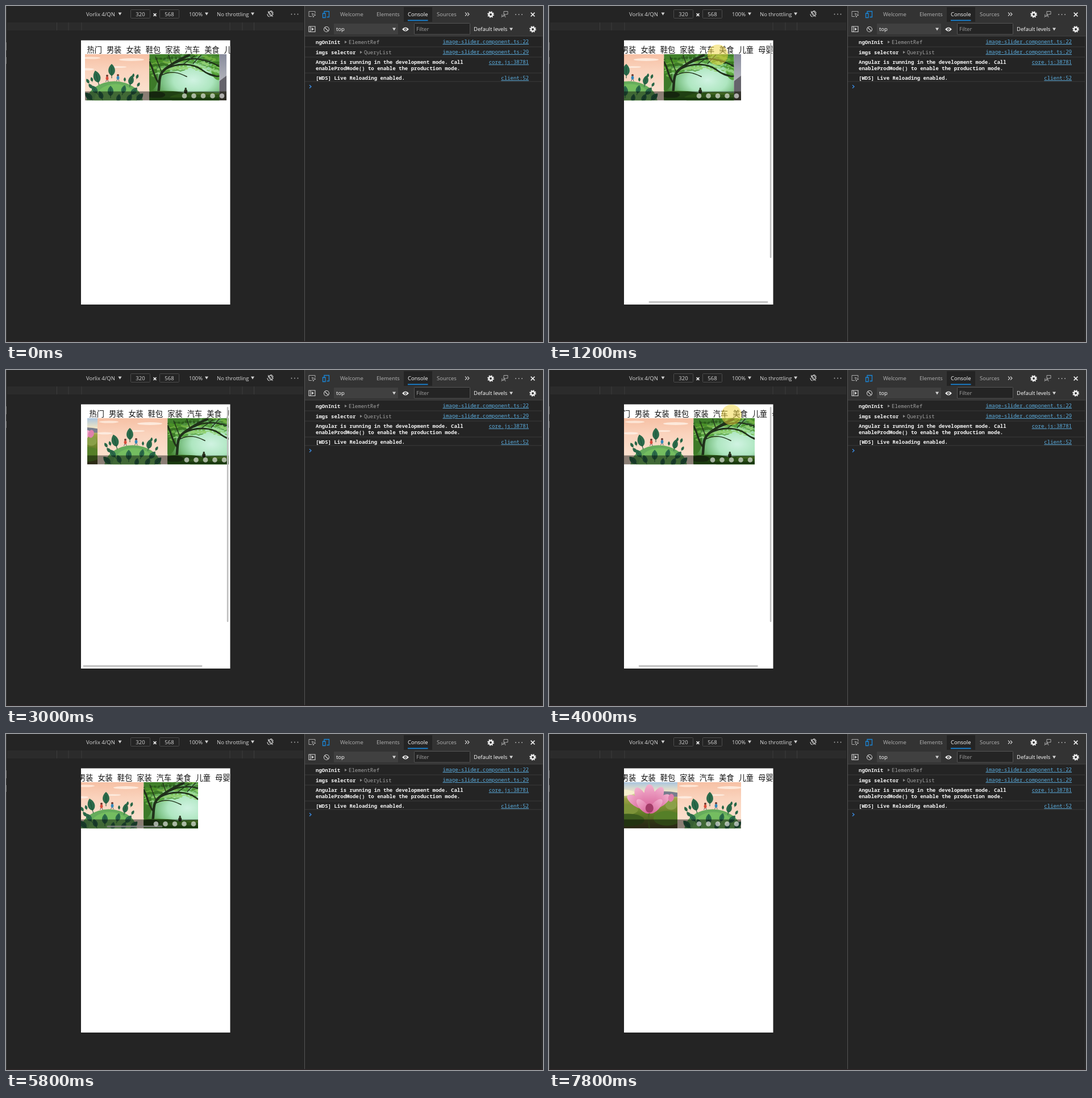
Animation of 945 by 592 pixels, one loop 8 s. Source, as an HTML page:

```html
<!DOCTYPE html>
<html lang="en">
<head>
<meta charset="utf-8">
<title>Slider in device mode</title>
<style>
  html, body { margin: 0; width: 100%; height: 100%; overflow: hidden; background: #242424; }
  svg { display: block; width: 945px; height: 592px; }
  text { font: 9.5px "Open Sans", "Noto Sans", sans-serif; fill: #d8d8d8; white-space: pre; }
  .mono { font: 9.03px "Noto Sans Mono", "DejaVu Sans Mono", monospace; }
  .log { font-weight: 600; fill: #f4f4f4; }
  .dim { fill: #a2a2a2; }
  .idle { fill: #b4b4b4; }
  .bright { fill: #fff; }
  .link { fill: #5caee0; text-anchor: end; text-decoration: underline; }
  .mid { text-anchor: middle; }
  .tab { font: 13.2px "Noto Sans CJK SC", "Noto Sans CJK", sans-serif; fill: #111; }
  .line { fill: none; stroke: #d4d4d4; stroke-width: 1.1; }
</style>
</head>
<body>
<svg viewBox="0 0 945 592">
  <defs>
    <clipPath id="screen"><rect x="132" y="60.5" width="262.5" height="465.5"/></clipPath>
    <clipPath id="window"><rect x="143" y="84.5" width="249" height="82"/></clipPath>
    <clipPath id="photo"><rect width="123.3" height="82"/></clipPath>
    <linearGradient id="peach" x2="0" y2="1">
      <stop stop-color="#f6c0a4"/><stop offset=".35" stop-color="#fad3bd"/><stop offset="1" stop-color="#fbe6d5"/>
    </linearGradient>
    <radialGradient id="glade" cx=".62" cy=".56" r=".62">
      <stop stop-color="#d0f3e2"/><stop offset=".45" stop-color="#aee6c0"/><stop offset=".7" stop-color="#7cc184"/><stop offset="1" stop-color="#41802b"/>
    </radialGradient>
    <linearGradient id="dawn" x2="0" y2="1">
      <stop stop-color="#a9c4df"/><stop offset=".22" stop-color="#f2e6c4"/><stop offset=".36" stop-color="#9ba245"/>
      <stop offset=".7" stop-color="#5d7a25"/><stop offset="1" stop-color="#4b4526"/>
    </linearGradient>
    <linearGradient id="storm" x2="0" y2="1">
      <stop stop-color="#878b9c"/><stop offset=".6" stop-color="#b3b4bc"/><stop offset=".75" stop-color="#6f6c64"/><stop offset="1" stop-color="#4c4a3c"/>
    </linearGradient>
    <linearGradient id="petal" x2="0" y2="1"><stop stop-color="#f3b1cf"/><stop offset="1" stop-color="#d65f96"/></linearGradient>
  </defs>
  <g id="chrome"></g>
  <g clip-path="url(#screen)">
    <rect x="132" y="60" width="263" height="467" fill="#fff"/>
    <g id="page">
      <g id="tabs"></g>
      <g clip-path="url(#window)">
        <g id="track"></g>
        <rect x="143" y="150.5" width="249" height="16" fill="#000" opacity=".45"/>
        <rect id="thumb" y="161.5" width="98" height="3" rx="1.5" fill="#888"/>
        <g id="dots"></g>
      </g>
    </g>
    <g id="bars" fill="#bfbfbf">
      <rect x="388.8" y="65" width="2.6" height="379" rx="1.3"/>
      <rect id="hbar" y="520.3" width="210" height="2.6" rx="1.3"/>
    </g>
    <circle id="touch" r="18" fill="#f2d63c" opacity=".5"/>
  </g>
</svg>
<script>
const $ = id => document.getElementById(id);
const rect = (x, y, w, h, fill, more = '') => `<rect x="${x}" y="${y}" width="${w}" height="${h}" fill="${fill}" ${more}/>`;
const text = (x, y, s, cls = '') => `<text x="${x}" y="${y}" class="${cls}">${s}</text>`;
const path = (d, more = 'class="line"') => `<path d="${d}" ${more}/>`;
const oval = (x, y, rx, ry, fill, turn = 0) =>
  `<ellipse cx="${x}" cy="${y}" rx="${rx}" ry="${ry}" fill="${fill}" transform="rotate(${turn} ${x} ${y})"/>`;
const down = (x, y) => path(`M${x - 3} ${y - 2.5}h6l-3 5z`, 'fill="#d4d4d4"');
const more = (x, y) => [0, 5.5, 11].map(d => oval(x + d, y, .9, .9, '#b5b5b5')).join('');
const gear = (x, y) => `<g fill="none" stroke="#f0f0f0"><circle cx="${x}" cy="${y}" r="3.2" stroke-width="2.6"/>
  <circle cx="${x}" cy="${y}" r="5" stroke-width="1.8" stroke-dasharray="1.96"/></g>`;
const cross = (x, y, r) => path(`M${x - r} ${y - r}l${2 * r} ${2 * r}m0 ${-2 * r}l${-2 * r} ${2 * r}`, 'stroke="#f0f0f0" stroke-width="1.5"');

function deviceBar() {
  const field = (x, s) => rect(x + .5, 6.5, 34, 15, '#242424', 'stroke="#4c4c4c" rx="1"') + text(x + 17.5, 17.5, s, 'mid');
  return rect(0, 0, 945, 592, '#242424') + rect(2, 29, 521, 14, '#2b2b2b')
    + [89, 109.5, 132.5, 393.5, 415.5, 436].map(x => rect(x, 29, 1, 14, '#3d3d3d')).join('')
    + rect(0, 0, 1, 592, '#3f3f3f') + rect(0, 64, 1, 14, '#777') + rect(0, 90, 1, 12, '#777')
    + text(141, 17.5, 'Vorlix 4/QN') + down(200.5, 14) + field(219, '320') + cross(262, 15.5, 2.4) + field(270, '568')
    + text(322, 17.5, '100%') + down(353, 14) + text(371, 17.5, 'No throttling') + down(434, 14)
    + path('M461.5 11.5l4-2.5 4.5 6-4 3zM460 14a5 5 0 0 0 4 5M470 13a5 5 0 0 0-4-4.5M461 9l8.5 10') + more(502.5, 14.5);
}

function toolTabs() {
  return rect(526, 0, 419, 28, '#333') + rect(700, 2, 50, 26, '#242424') + rect(707, 24.5, 35.5, 1.8, '#1a86d8')
    + path('M538 18.5h-5v-9h11v4M538.5 13l6.5 3-3 1-1.3 3z', 'fill="none" stroke="#aaa"')
    + path('M560 14v-4.500h8.500v10h-4M557.500 13h4.500v7.500h-4.500z', 'fill="none" stroke="#1a86d8" stroke-width="1.3"')
    + text(588, 18, 'Welcome', 'idle') + text(652, 18, 'Elements', 'idle')
    + text(707, 18, 'Console', 'bright') + text(758, 18, 'Sources', 'idle')
    + path('M808 11.500l3 3-3 3m4-6l3 3-3 3') + gear(853, 15)
    + path('M876 9.500h7v5h-3l-2 2v-2h-2zM872 20a3.500 3 0 0 1 7 0M873.500 14.500a2 2 0 1 0 2 0', 'fill="none" stroke="#aaa"')
    + more(897, 15) + cross(927, 15, 3.4);
}

function consoleBar() {
  return rect(526, 28, 419, 25, '#333') + rect(526, 52.5, 419, 1, '#444')
    + path('M533 36h11v9.500h-11zM536 36v9.500') + path('M538 38l4 2.700-4 2.700z', 'fill="#d4d4d4"')
    + `<circle cx="564" cy="41" r="4.500" class="line"/>` + path('M561 38l6 6') + rect(577, 31, 113, 19, '#404040', 'rx="1"')
    + text(581, 44, 'top', 'bright') + down(683, 41)
    + path('M697 41q6-7 12 0q-6 7-12 0z', 'fill="#f0f0f0"') + oval(703, 41, 2.2, 2.2, '#333') + oval(703, 41, 1, 1, '#f0f0f0')
    + rect(718.5, 30.5, 98, 19.5, '#242424', 'stroke="#555" rx="1"') + text(722, 44, 'Filter', 'dim')
    + text(823, 44, 'Default levels', 'bright') + down(889, 41) + gear(927, 41);
}

function logRows() {
  const log = (y, s) => text(545, y, s, 'mono log');
  const link = (y, s) => text(920, y, s, 'mono link');
  const object = (x, y, s) => path(`M${x - 7} ${y - 5.5}l4 2.500-4 2.500z`, 'fill="#888"') + text(x, y, s, 'mono dim');
  return [71.5, 89.5, 117.5, 132.5].map(y => rect(526, y, 417, 1, '#3a3a3a')).join('')
    + log(66.5, 'ngOnInit') + object(603, 66.5, 'ElementRef') + link(66, 'image-slider.component.ts:22')
    + log(84.5, 'imgs selector') + object(630, 84.5, 'QueryList') + link(84, 'image-slider.component.ts:29')
    + log(102, 'Angular is running in the development mode. Call') + log(113, 'enableProdMode() to enable the production mode.')
    + link(102, 'core.js:38781') + log(130, '[WDS] Live Reloading enabled.') + link(130, 'client:52')
    + path('M534 139.300l3 2.700-3 2.700', 'fill="none" stroke="#3b8ee8" stroke-width="1.300"')
    + rect(525, 0, 1, 592, '#555') + rect(943, 53, 1, 538, '#303030') + rect(0, 590.5, 945, 1.5, '#2f2628');
}

const leaf = (x, y, size, turn = 0, tone = '#2b6a4a') =>
  `<g transform="translate(${x} ${y}) rotate(${turn}) scale(${size})">
   <path d="M0-11C7-5 8 5 0 9C-8 5-7-5 0-11z" fill="${tone}"/><path d="M0-6v19" stroke="#1d5238" stroke-width="1"/></g>`;
const kid = (x, y, shirt) => oval(x, y - 4.5, 2, 1.9, '#6b3a30') + oval(x, y, 2.4, 3.2, shirt)
  + path(`M${x - 1} ${y + 3}l-1.500 3m3.500-3l1 3`, 'stroke="#455" stroke-width="1"');

function hillScene() {
  return rect(0, 0, 124, 82, 'url(#peach)')
    + oval(20, 7, 17, 2, '#fde6d6') + oval(92, 10, 22, 2.5, '#fde9db') + oval(68, 23, 15, 1.6, '#fde9db') + oval(13, 27, 13, 2, '#fdebdf')
    + oval(62, 86, 50, 38, '#66ac5c') + oval(64, 84, 38, 31, '#74bd60')
    + leaf(57, 29, 1.05) + leaf(31, 41, 1.1, -15) + leaf(91, 47, .85, 12) + leaf(102, 40, .4, 20) + leaf(104, 54, .4, 30)
    + leaf(15, 48, .45, -30) + leaf(22, 45, .4, -15) + leaf(80, 45, .35) + leaf(95, 38, .35, 10) + leaf(20, 57, .5, -40)
    + leaf(27, 63, .8, -35) + leaf(55, 66, .9) + leaf(78, 63, .75, 15) + leaf(96, 66, .8, 40)
    + leaf(38, 73, .75, -20) + leaf(17, 75, .85, -45) + leaf(106, 76, .8, 45) + leaf(69, 78, .7, 10) + leaf(88, 78, .75, 25)
    + kid(49, 43, '#d94f3d') + kid(68, 42, '#3489bd');
}

function forestScene() {
  const bough = (d, w) => path(d, `fill="none" stroke="#20301a" stroke-width="${w}" stroke-linecap="round"`);
  let leaves = '';
  for (let i = 0; i < 120; i++) {
    const x = i * 37.7 % 124, depth = i * 23.3 % 30;
    const y = depth + Math.abs(x - 72) * .18 - 3;
    const tones = depth < 14 ? ['#2b5c1b', '#4c9327', '#74b23f', '#37731f'] : ['#6db646', '#8fce69', '#4f9a34', '#9bd98a'];
    leaves += oval(x, y, 3 + i % 4, 1 + i % 3 * .8, tones[i % 4], i * 31 % 60 - 30);
  }
  return rect(0, 0, 124, 82, 'url(#glade)') + oval(2, 40, 13, 24, '#3d7a29') + oval(122, 26, 13, 20, '#529d38')
    + `<g opacity=".85">${leaves}</g>`
    + bough('M15 74C20 52 13 37 30 25S55 9 70 2', 4.5) + bough('M16 50C8 41 6 22 0 14', 3)
    + bough('M30 26C52 14 79 18 91 27S113 41 123 39', 2.8) + bough('M46 16C69 3 100 8 123 22', 2.5)
    + bough('M22 37C40 29 52 33 66 40', 1.5) + bough('M77 17L91 2M23 36L11 5M100 33l16 5M60 18l20-15M40 20L34 2', 1.4)
    + oval(25, 73, 43, 8, '#3b7522') + oval(90, 78, 54, 11, '#4a8f26') + oval(102, 70, 27, 2, '#74b53c')
    + oval(12, 72, 16, 6, '#27451a') + oval(64, 66, 3, 4, '#29331e') + oval(64, 61, 1.7, 1.7, '#29331e') + rect(0, 77, 124, 5, '#2d6519');
}

function lotusScene() {
  const petal = (x, y, rx, ry, turn) => oval(x, y, rx, ry, 'url(#petal)', turn);
  return rect(0, 0, 124, 82, 'url(#dawn)') + oval(18, 19, 30, 6, '#f7efcd') + path('M62 22Q92 13 124 19v7H58z', 'fill="#787d8d"')
    + oval(27, 49, 27, 10, '#7e9439') + oval(36, 67, 29, 11, '#3d5c1e') + oval(105, 64, 24, 13, '#557f28') + oval(112, 41, 10, 8, '#8aa048')
    + path('M74 47Q71 65 74 82', 'fill="none" stroke="#526c25" stroke-width="3"')
    + petal(51, 35, 8, 19, -56) + petal(95, 34, 8, 18, 54) + petal(60, 29, 9, 21, -27) + petal(87, 28, 9, 21, 27)
    + petal(74, 27, 10, 23, 0) + petal(63, 43, 7, 16, -42) + petal(85, 43, 7, 16, 42) + oval(74, 46, 7, 8, '#a23b67')
    + oval(112, 28, 5, 7, '#df80ab', 15);
}

const lakeScene = () => rect(0, 0, 124, 82, 'url(#storm)') + path('M0 48L22 31 51 50 84 28 124 52V66H0z', 'fill="#65636b"');

$('chrome').innerHTML = deviceBar() + toolTabs() + consoleBar() + logRows();
$('tabs').innerHTML = ['热门', '男装', '女装', '鞋包', '家装', '汽车', '美食', '儿童', '母婴']
  .map((s, i) => text(146.5 + 34.45 * i, 81.7, s, 'tab')).join('');
$('track').innerHTML = [lotusScene, hillScene, forestScene, lakeScene]
  .map((draw, i) => `<g transform="translate(${(i - 1) * 123.2} 0)" clip-path="url(#photo)">${draw()}</g>`).join('');
$('dots').innerHTML = [0, 1, 2, 3, 4]
  .map(i => `<circle cx="${318 + 16.5 * i}" cy="158.4" r="4.3" fill="#fff" opacity=".6"/>`).join('');

// [time, value] pairs, linear between them
const scroll = [[600, 4], [1200, 54], [2200, 54], [2400, 42], [2800, 8], [3000, 0], [3800, 0], [4000, 30], [4200, 54]];
const slide = [[1800, -10], [2000, 6], [2200, 18], [5600, 18], [5800, 30], [6000, 30], [6400, 58], [6800, 96], [7000, 119], [7200, 137]];
const bars = [[600, 0], [800, 1], [1200, 1], [1800, 0], [2200, 0], [2400, 1], [3200, 1], [3600, 0], [3800, 0], [4000, 1], [4200, 1], [4600, 0]];
const thumb = [[5600, 0], [5800, .8], [7200, .8], [7800, 0]];
const at = (keys, t) => {
  const i = keys.findIndex(k => k[0] > t);
  if (i < 0) return keys[keys.length - 1][1];
  if (i === 0) return keys[0][1];
  const [[t0, a], [t1, b]] = [keys[i - 1], keys[i]];
  return a + (b - a) * (t - t0) / (t1 - t0);
};
const set = (el, attrs) => { for (const k in attrs) el.setAttribute(k, attrs[k]); };

function draw(now) {
  const t = Math.floor(now % 8000 / 200) * 200;
  const x = at(scroll, t), s = at(slide, t);
  const drag = t >= 800 && t <= 1200, again = t >= 4000 && t <= 4200;
  set($('page'), { transform: `translate(${-x} 0)` });
  set($('track'), { transform: `translate(${143 + s} 84.5)` });
  set($('thumb'), { x: 146 + (246 - s) / 615 * 243, opacity: at(thumb, t) });
  set($('dots').children[2], { opacity: t >= 6600 && t < 7200 ? .95 : .6 });
  set($('bars'), { opacity: at(bars, t) });
  set($('hbar'), { x: 135.5 + x * 40 / 54 });
  set($('touch'), { cx: 351 - x, cy: again ? 79 : 86, visibility: drag || again ? 'visible' : 'hidden' });
}

const start = performance.now();
function tick() {
  draw(performance.now() - start);
  requestAnimationFrame(tick);
}
tick();
</script>
</body>
</html>
```
